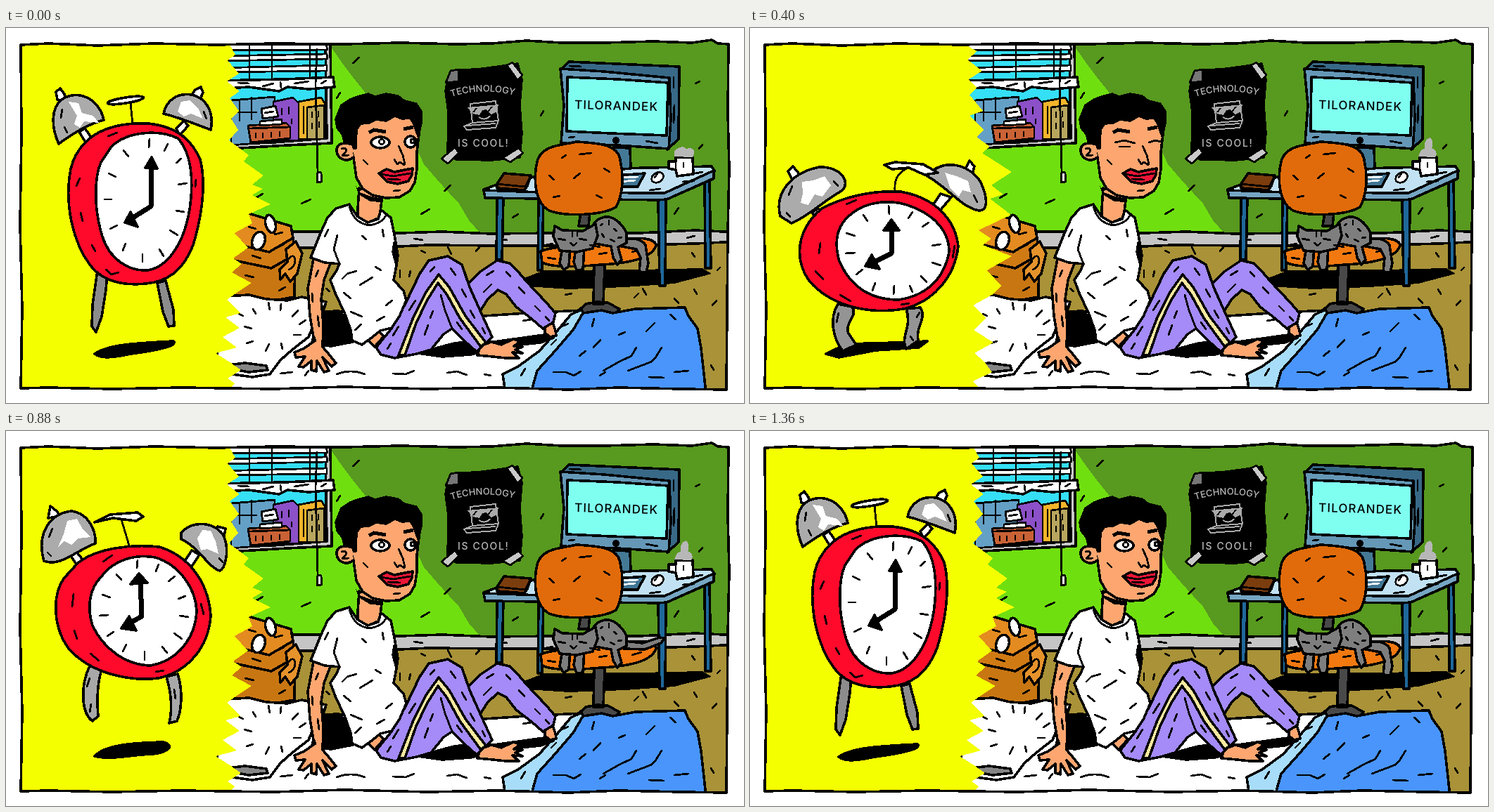
These frames come from a looping animation (1049x534 px, 1440 ms). An HTML page:

```html
<!DOCTYPE html>
<html lang="en">
<head>
<meta charset="utf-8">
<title>Good morning</title>
<style>
html,body{margin:0;width:100%;height:100%;overflow:hidden;background:#fff}
svg{display:block;width:100%;height:100%}
.o,.l{stroke:#000;stroke-width:3.6;stroke-linejoin:round;stroke-linecap:round}
.l{stroke-width:2.8}
.l:not([fill]):not(.w){fill:none}
.hand{stroke-width:7}.key{stroke:#fff}
.w{fill:#fff}.g{fill:#ababab}.red{fill:#ff0a2b}.skin{fill:#fda670}.pur{fill:#a48bf7}.cat{fill:#7e7e7e}.leg{fill:#1f689b}
text{font-family:Inter,"Open Sans",sans-serif;font-weight:500}
/* drawings are held and swapped in ninths of the loop */
.s{animation:1440ms step-end infinite}
.hi{animation-name:hi}.mid{animation-name:mid}.low{animation-name:low}
.e1{animation-name:e1}.e2{animation-name:e2}
.open{animation-name:open}.shut{animation-name:shut}
.glow{animation-name:glow}
.st1{animation-name:st1}.st2{animation-name:st2}.st3{animation-name:st3}
.nap{animation-name:nap}.up{animation-name:up}
.t1{animation-name:t1}.t2{animation-name:t2}.t3{animation-name:t3}
@keyframes hi{0%,44.4%,66.6%,88.8%{visibility:visible}11.1%,55.5%,77.7%,to{visibility:hidden}}
@keyframes mid{0%,22.2%,44.4%,66.6%,88.8%,to{visibility:hidden}11.1%,33.3%,55.5%,77.7%{visibility:visible}}
@keyframes low{0%,33.3%,to{visibility:hidden}22.2%{visibility:visible}}
@keyframes e1{0%,33.3%,77.7%,to{visibility:visible}11.1%,66.6%{visibility:hidden}}
@keyframes e2{0%,33.3%,77.7%,to{visibility:hidden}11.1%,66.6%{visibility:visible}}
@keyframes open{0%,55.5%,to{visibility:visible}22.2%{visibility:hidden}}
@keyframes shut{0%,55.5%,to{visibility:hidden}22.2%{visibility:visible}}
@keyframes glow{0%,22.2%,to{fill:#7ffff0}11.1%{fill:#d2fff8}}
@keyframes st1{0%,44.4%,77.7%{visibility:visible}22.2%,55.5%,88.8%,to{visibility:hidden}}
@keyframes st2{0%,33.3%,66.6%{visibility:hidden}22.2%,55.5%,88.8%,to{visibility:visible}}
@keyframes st3{0%,44.4%,77.7%,to{visibility:hidden}33.3%,66.6%{visibility:visible}}
@keyframes nap{0%,77.7%,to{visibility:visible}66.6%{visibility:hidden}}
@keyframes up{0%,77.7%,to{visibility:hidden}66.6%{visibility:visible}}
@keyframes t1{0%,66.6%,to{visibility:visible}44.4%{visibility:hidden}}
@keyframes t2{0%,55.5%,to{visibility:hidden}44.4%{visibility:visible}}
@keyframes t3{0%,66.6%,to{visibility:hidden}55.5%{visibility:visible}}
</style>
</head>
<body>
<svg viewBox="0 0 1049 534" preserveAspectRatio="none" shape-rendering="crispEdges">
<defs>
<path id="panel" d="M21 24 60 22 130 25 210 22 300 24 380 22 480 23 560 21 640 23 690 22 740 18 790 21 850 21 920 19 975 21 1003 17 1012 22 1027 23 1026 120 1028 200 1026 290 1025 400 1024 515 960 514 870 512 800 515 700 512 600 514 480 511 380 514 250 512 150 514 60 512 21 513 23 400 20 280 22 150Z"/>
<clipPath id="cut"><use href="#panel"/></clipPath>
<path id="arc" d="M633 98Q680 83 730 98"/>
</defs>
<g clip-path="url(#cut)">

<g id="room">
<path fill="#70df10" d="M300 15H700V310H300Z"/>
<path fill="#58991f" d="M458 15 464 30 478 50 493 70 513 95 540 122 568 150 584 172 594 194 612 215 630 235 644 250 658 274 674 292H1040V15Z"/>
<path fill="#a99238" d="M300 305H1040V525H300Z"/>
<path class="o" fill="#c5c5c5" d="M300 291 440 290 560 292 620 290 690 293 780 292 900 292 980 288 1040 291V304L980 307 870 310 700 310 600 309 540 312 430 313 300 312Z"/>
<path class="l" d="M493 50 502 42M980 79 986 76M760 125 764 118M590 265 602 258M623 232 632 224M355 242 365 236M420 250 433 244M950 265 956 256M985 172 990 166M720 270 728 265M470 100 475 92M580 300 592 302M700 300 712 302M968 299 979 296M590 317 596 320M628 312 633 322M668 318 673 312M975 320 979 326M950 385 956 392M978 372 982 379M1004 395 1010 388M1002 480 1006 487M893 384 899 378M560 345 560 355M575 346 573 354M455 371 460 375M795 380 804 378M905 371 910 380M1011 345 1015 341"/>
</g>

<g id="window">
<path class="o" fill="#c9c9c9" d="M300 20 461 20 463 164 400 167 300 173Z"/>
<path class="o" fill="#35dff5" d="M300 20H454L456 157 380 163 300 166Z"/>
<path class="l" fill="#64a0c6" d="M320 103 382 98V162L320 167Z"/>
<path class="l" fill="#8c50c8" d="M380 105 408 99 416 107V160H380Z"/>
<path class="l" fill="#f4b52b" d="M416 105 448 99 453 107V158H416Z"/>
<path class="l" fill="#b8a65e" d="M428 113 452 110V158H428Z"/>
<path class="l" d="M332 104V132M349 99V130M320 120H356M392 115V123M402 113V122M406 130V136M435 120V127M444 119V126M435 136V143M445 134V141M423 112V150"/>
<path class="l" fill="#c96235" d="M344 139 398 135 404 141V157L348 163Z"/>
<path class="l" d="M347 143 403 141M355 150V156M365 150V156M377 149V155M389 148V154"/>
<path class="l w" d="M363 115 383 111 387 126 365 129ZM361 133 392 130V137L361 139ZM368 121 380 119"/>
<path class="l w" d="M300 24 455 24 457 31 300 32ZM300 40 456 37 457 44 300 47ZM300 57 456 53V61L300 63Z"/>
<path class="o w" d="M300 75 395 73 465 70 467 84 430 87 400 84 388 90 345 84 300 87Z"/>
<path class="l" d="M346 24V72M378 24V72M432 24V72M442 30 440 80 443 203M330 78 345 79M365 83 380 79M390 77 391 85M410 79 430 76M448 79 455 75"/>
<path class="l w" d="M443 205 448 206 449 219 442 220Z"/>
</g>

<g id="poster">
<path class="o" d="M628 72 640 60 670 59 700 55 727 51 733 73 730 110 733 150 730 184 690 188 640 187 628 182 629 120 625 90Z"/>
<path class="l" fill="#777" d="M625 78 632 61 643 59 644 76Z"/>
<path class="l" fill="#c9c9c9" d="M712 53 720 49 734 67 727 74ZM619 186 638 170 644 178 628 193ZM706 185 728 171 735 178 717 191Z"/>
<g fill="#b9b9b9"><text font-size="13"><textPath href="#arc">TECHNOLOGY</textPath></text>
<text x="642" y="169" font-size="14" letter-spacing="1.6">IS COOL!</text></g>
<path fill="none" stroke="#aaa" stroke-width="2" d="M660 108 696 104 700 132 663 135ZM663 135 651 140 655 145 696 142 700 132M655 139 696 136M672 127Q681 133 688 125"/>
<path fill="#aaa" d="M656 113 700 109 698 119 690 123 682 116 677 117 673 124 663 122Z"/>
<path stroke="#000" stroke-width="2" d="M664 120 669 114M685 119 691 112"/>
</g>

<g id="desk">
<path d="M734 357 765 345 900 344 990 342 1003 350 950 364 880 369 800 372 740 368Z"/>
<path class="o leg" d="M698 242H707L705 330 697 330ZM757 240H764L762 345H756ZM993 215H1000L1002 342H994Z"/>
<path class="o" fill="#c2e2f4" d="M679 230 700 222 756 211 870 200 1003 197 1007 203 1005 215 937 245 800 243 681 242Z"/>
<path class="o" fill="#76a6c3" d="M679 231 760 234 936 235 1006 203 1006 214 937 245 760 243 681 242Z"/>
<path class="o leg" d="M927 245 938 244 937 367H929Z"/>
<path class="o" fill="#447996" d="M864 170 887 171 888 200 866 202Z"/>
<path class="o" fill="#386987" d="M789 59 800 48 957 55 956 158 940 173Z"/>
<path class="o" fill="#6598b7" d="M788 58 850 62 943 71 945 130 942 172 870 167 789 164 793 110Z"/>
<path class="o s glow" fill="#7ffff0" d="M798 70 870 73 941 78 939 153 860 150 797 147Z"/>
<path class="l" d="M949 70V85M950 110 949 135M801 54 817 55M910 161 926 164M800 156 808 155"/>
<circle cx="867" cy="160" r="5"/>
<text transform="translate(808 115) rotate(1.5)" font-size="17" letter-spacing="1.1">TILORANDEK</text>
<path class="o" fill="#7b3d0e" d="M698 222 708 207 746 210 741 225 737 231 698 228Z"/>
<path class="l" d="M698 222 738 226 746 210M915 231 930 229M962 219 978 218M980 207 990 205"/>
<path class="o" fill="#407695" d="M868 210 908 207 898 226 865 226Z"/>
<path class="l key" d="M876 213 898 212M873 219 894 217"/>
<path class="l w" d="M918 218C916 207 929 202 934 208 937 216 926 224 918 218ZM926 207 922 213"/>
<path class="o w" d="M952 184 976 184 977 208 954 211 952 202 942 200 942 190 952 190Z"/>
<path class="l" d="M952 190V202M963 192V198"/>
<g fill="#b7b7b7">
<path class="s st1" d="M950 183Q948 174 956 171 963 167 967 172 978 169 978 177 977 183 976 184Z"/>
<path class="s st2" d="M950 183Q953 172 959 172 957 159 967 156 973 163 969 171 979 176 974 184Z"/>
<path class="s st3" d="M950 183Q949 172 961 173 964 164 971 169 967 177 974 178V184ZM964 153H970V160H964Z"/>
</g>
</g>

<g id="chair">
<path class="o" fill="#494949" d="M817 262H830L828 282H814ZM836 337 851 337 849 393H835ZM812 404 824 393 840 390 855 391 872 400 864 410H820Z"/>
<path class="o" fill="#e16b0a" d="M755 190C762 166 790 167 811 162 844 164 870 166 873 188 880 218 874 243 867 255 847 267 795 269 772 260 750 248 750 211 755 190Z"/>
<path class="l" d="M772 210 779 216M807 214 816 207M815 180 832 178M839 238 847 242M778 241 787 239M850 200 858 205M790 185 796 181"/>
<path class="o" fill="#f27910" d="M760 318C780 309 830 311 878 302 903 296 924 301 924 310 918 327 888 335 846 337 815 340 779 342 762 334Z"/>
<path class="l" d="M770 327 781 329M843 322 854 320M890 319 903 315"/>
<g class="o cat">
<path class="s t1" d="M878 301C892 298 904 301 909 309L913 335 910 348 900 347 902 327 896 315 875 311Z"/>
<path class="s t2" d="M879 303 900 303 914 319 928 337 921 343 909 331 897 314 877 312Z"/>
<path class="s t3" d="M879 299 905 302 929 294 936 295 931 302 908 311 878 310Z"/>
<path d="M837 307C827 292 833 276 845 271 859 264 875 276 882 292V306L870 312 875 330 869 337 863 327 860 311Z"/>
<g class="s nap">
<path d="M810 314 822 312 820 344 811 345 807 333ZM791 312 802 311 800 339 793 345 787 335Z"/>
<path d="M778 297 780 282 791 288 820 289 838 279 841 296 834 314 811 319 787 317Z"/>
<path class="l" d="M785 300 795 302M815 300 825 302M802 306 807 310 811 306M805 291V297M812 290V296M777 307 768 309M830 309 844 312"/>
</g>
<g class="s up">
<path d="M817 305 826 304 823 340 816 348 812 332ZM788 309 799 310 798 340 791 347 784 337Z"/>
<path d="M781 295 780 278 791 283 822 283 837 274 840 297 829 312 809 317 790 313Z"/>
<path class="l" d="M789 295 797 295M813 294 822 294M801 303 806 309 810 303M805 285V291M813 284V290M784 306 775 309M829 303 844 305"/>
</g>
<path class="l" d="M845 281 848 279M857 274V280M864 286 868 289M847 293 850 298M870 299 875 298M859 301 865 304"/>
</g>
</g>

<g id="bed">
<path class="o" fill="#c87612" d="M320 322 377 341 411 322 410 383 370 390 320 380Z"/>
<path class="o" fill="#e38b20" d="M320 265 345 264 405 282 408 299 374 319 320 306Z"/>
<path class="o" fill="#d07a14" d="M320 306 374 319 408 299 412 322 377 342 320 330Z"/>
<path class="o" fill="#e6932c" d="M398 315 412 304 421 321 414 350 404 361 397 350 390 358 389 344 400 333Z"/>
<path class="l" d="M402 329Q409 320 411 330 411 341 402 344M345 283 355 286M382 294 393 291M350 324 362 328M340 352 352 355M388 374 397 369M386 312 395 308"/>
<ellipse class="o w" cx="359" cy="303" rx="9" ry="13" transform="rotate(18 359 303)"/>
<ellipse class="o w" cx="376" cy="279" rx="7" ry="13" transform="rotate(-15 376 279)"/>
<path class="o w" d="M320 412 410 407 470 403 550 409 665 411 740 406 818 402 790 450 730 525H300V490Z"/>
<path class="l" d="M425 495 430 488M390 492 407 490M470 493Q490 485 510 493M550 492 568 493 580 488M627 491 641 489 655 494M680 493 689 495M735 417 752 414M674 425 684 427"/>
<path class="o" fill="#a8ddfa" d="M818 401 803 408 782 433 758 460 728 482 706 493 710 520H748L765 480 804 437 822 410Z"/>
<path class="o" fill="#4995fc" d="M820 406 847 402 862 406 895 400 965 398 970 410 983 428 988 456 995 520H746L755 488 782 458 806 430Z"/>
<path class="l" d="M836 414 833 425M871 437 880 433M922 420 910 432M944 408 952 415M845 444 835 455M896 455 889 467 872 475 849 488M932 455 924 468 918 475 884 488M778 490 796 490 807 495 817 489M815 467 824 460M844 495 852 490M914 497 935 498M950 490 970 488M790 425 799 421M782 444 775 451M738 485 732 495"/>
<path class="o w" d="M300 383 345 380 370 386 400 388 420 383 455 390 452 400 438 421 430 440 407 458 390 473 375 493 350 497 300 490Z"/>
<path class="o" fill="#858585" d="M300 482 340 477 370 481 372 487 345 490Z"/>
<path class="l" d="M351 400 355 407M373 391 375 401M391 393 390 402M415 402 407 411M426 416 417 422M419 437 409 437M339 425 349 428M342 449 351 446M369 460 374 450M393 457 391 449M331 407 337 410"/>
<path class="o" d="M449 404 476 404 490 429 493 447 462 453 434 450 442 425Z"/>
<path class="o" d="M585 463 637 449 674 445 693 447 765 437 778 441 760 448 720 452 660 465 620 468Z"/>
</g>

<g id="man">
<path class="o skin" d="M766 426 777 419 781 431 782 438 773 440 766 434Z"/>
<path class="o pur" d="M655 366 674 347 698 331 716 335 728 347 739 360 768 391 781 406 778 419 763 428 747 414 725 397 711 379 699 373 684 387 673 405 660 397Z"/>
<path class="l" d="M683 352 693 346M711 347 717 354M729 369 737 378M752 396 759 403M690 365 679 376M767 411 772 417"/>
<path class="o skin" d="M674 453 690 447 704 451 721 443 731 446 722 453 734 454 724 458 734 463 720 462 729 470 711 470 682 467 670 466Z"/>
<path class="o skin" d="M514 444 528 430 537 439 524 454Z"/>
<path class="o pur" d="M526 455 548 428 568 392 588 350 601 331 628 325 648 337 659 369 676 407 691 440 669 461 652 446 634 428 622 436 604 458 584 464 552 470 533 465Z"/>
<path class="o" fill="#fce9a0" d="M558 466 579 412 597 376 615 351 630 369 653 410 682 448 675 454 645 413 627 380 614 363 599 387 583 420 567 466Z"/>
<path class="l" d="M618 380 624 402 634 428M603 347 609 340M632 342 639 352M648 372 654 383M660 402 666 413M677 427 681 435M582 388 573 402M558 425 550 438M547 449 542 457M607 403 603 413M600 423 595 437M641 419 648 429"/>
<path class="o skin" d="M437 329 462 333 452 359 448 386 451 422 450 454 461 467 469 477 463 482 450 469 459 488 452 490 442 474 441 489 434 487 434 474 423 483 416 482 425 468 412 469 410 462 424 456 438 446 432 410 429 371Z"/>
<path class="l" d="M440 354 444 345M435 378 436 390M443 410 445 425M438 440 440 446"/>
<path class="o skin" d="M502 228 500 258 500 271 515 277 531 270 535 237Z"/>
<path class="o w" d="M488 251 469 257 457 270 447 292 433 327 453 334 474 336 469 347 461 359 469 380 481 405 490 430 492 445 506 451 521 440 532 431 548 427 559 411 569 388 565 374 551 359 555 338 557 324 552 294 547 270 533 259 529 272 514 277 499 268Z"/>
<path class="o" d="M552 306 557 324 555 337 550 319Z"/>
<path class="l" d="M488 253Q493 277 516 281 537 278 541 264M471 295 466 315 474 336M458 287 453 297M506 296 512 301M535 287 537 297M478 357 485 350 498 346M480 377 490 385M503 366 521 355M490 404 506 411M540 395 549 388M527 417 538 411M525 340 533 345M496 430 505 422"/>
<path d="M497 224 503 234 516 239 535 243 533 248 518 247 501 237Z"/>
<path class="o skin" d="M497 137 521 126 554 120 582 126 587 151 584 177 584 201 581 220 574 232 559 241 540 242 521 238 507 229 498 213 494 185 489 168Z"/>
<path class="o" d="M484 170 478 151 471 142 469 130 477 110 489 102 503 97 515 94 524 98 540 94 557 97 566 104 583 108 590 119 590 135 586 154 580 137 575 128 563 129 553 125 540 132 526 130 516 135 504 136 498 145 497 171Z"/>
<path class="o skin" d="M492 166C478 161 469 166 470 176 472 187 484 192 494 184"/>
<path class="l" d="M477 172Q485 169 483 176L478 182 487 181M508 188 514 194M551 232 560 231"/>
<path class="l" d="M558 168 564 181 567 194M552 187 556 194 560 191 566 195"/>
<path fill="none" stroke="#000" stroke-width="5" d="M516 149 523 145 540 148M565 144 579 141"/>
<g class="s open">
<ellipse class="o w" cx="532" cy="163" rx="13" ry="8"/><circle class="l w" cx="534" cy="162" r="3.5"/>
<ellipse class="o w" cx="575" cy="162" rx="8" ry="8"/><circle class="l w" cx="578" cy="161" r="3"/>
</g>
<path class="s shut l" d="M519 163 532 160 547 164M567 163 576 160 584 162M525 169 540 169"/>
<path class="o" fill="#ed1537" d="M530 207 541 201 552 205 562 203 572 201 578 200 577 209 572 218 557 222 542 219Z"/>
<path class="l" d="M532 208 551 211 575 207M543 215 560 216"/>
</g>

<path class="s e1" fill="#f4ff00" d="M0 0H318V24L326 38 315 46 331 65 314 76 332 90 318 100 331 118 320 129 330 145 317 160 345 181 338 190 366 210 350 223 365 229 350 238 376 251 345 265 350 278 325 292 344 313 323 328 335 336 321 348 349 363 325 379 314 387 333 406 312 412 332 427 308 440 328 455 298 463 320 477 334 487 315 499 325 506 308 525H0Z"/>
<path class="s e2" fill="#f4ff00" d="M0 0H306V24L323 33 309 45 330 61 311 73 322 85 312 95 331 118 312 125 333 145 322 155 341 169 330 178 372 205 343 224 360 237 341 243 371 266 325 288 343 300 331 309 372 325 337 345 357 367 344 380 317 395 335 413 318 430 346 448 319 463 333 475 344 490 317 503 337 525H0Z"/>

<g id="clock">
<g class="s hi">
<path class="o" d="M126 464C145 451 180 449 238 446 246 453 209 460 178 464 149 470 135 471 126 464Z"/>
<path class="o" fill="#8c8c8c" d="M130 345 144 350 142 373 136 411 128 433 122 425 123 394ZM215 363 227 360 238 401 239 424 231 425 223 404Z"/>
<path class="o w" d="M104 148 112 143 126 162 117 169ZM242 143 253 132 259 139 247 153Z"/>
<path class="o w" d="M73 102 71 91 77 86 83 94 85 105ZM263 97 269 88 277 84 280 92 276 101Z"/>
<path class="o g" d="M75 165C64 141 64 114 79 102 102 86 133 101 139 131 116 137 95 150 75 165ZM224 122C228 103 243 92 264 95 286 100 296 122 291 145 270 137 248 128 224 122Z"/>
<path class="w" d="M89 105 103 107 108 121 124 125 132 135 111 133 105 142 97 137 101 125ZM249 105 261 103 273 114 280 129 263 122 253 126 244 119Z"/>
<path class="l" d="M80 116 78 128M83 141 87 149M281 119 285 129M177 106 180 138"/>
<ellipse class="o w" cx="170" cy="103" rx="26" ry="4" transform="rotate(-9 170 103)"/>
<path class="o red" d="M105 172C124 145 160 134 202 136 242 140 263 158 276 187 285 222 278 270 266 309 251 347 229 361 199 364 160 368 134 357 119 337 95 304 85 255 90 213 92 194 98 181 105 172Z"/>
<path class="o w" d="M150 169C172 147 217 144 244 157 264 177 267 220 261 258 254 302 233 339 202 345 173 347 147 328 137 297 124 255 126 212 135 191Z"/>
<path class="l" d="M204 158 203 170M230 165 225 175M249 186 242 192M257 221 245 223M253 262 242 260M244 295 233 288M224 325 218 315M194 333 194 322M166 317 170 307M148 286 158 281M140 244 150 244M146 207 156 212M167 174 174 183M105 214 100 225M106 263 109 275M122 309 127 318M145 154 158 149M142 344 150 351 160 348M270 216 269 226"/>
<path class="l hand" d="M206 196V254L174 274"/><path class="o" d="M198 199 207 184 215 200ZM169 277 177 262 187 283Z"/>
</g>

<g class="s mid">
<path class="o" d="M126 463C140 447 181 444 224 443 240 448 232 457 209 460 176 461 149 469 126 463Z"/>
<path class="o" fill="#a8a8a8" d="M120 332 138 334C129 357 129 382 131 406L123 413C109 404 103 367 120 332ZM228 350 244 346C253 374 248 402 243 413L232 416C237 394 234 370 228 350Z"/>
<path class="o w" d="M92 178 101 173 117 193 108 201ZM251 190 264 170 275 176 260 199Z"/>
<path class="o w" d="M60 124 63 107 72 114 77 121ZM297 145 301 136 312 139 310 150Z"/>
<path class="o g" d="M54 185C44 151 58 118 93 114 120 118 128 145 127 160 97 172 76 194 54 185ZM249 145C264 126 300 129 310 151 318 172 311 196 304 199 288 195 274 165 249 154Z"/>
<path class="w" d="M87 128 101 125 109 140 120 151 103 153 93 162 83 157 74 165 82 147ZM279 141 291 142 298 157 302 175 286 168 277 170 272 153Z"/>
<path class="l" d="M66 139 61 151M59 173 64 178M303 181 308 187M164 126 175 163"/>
<path class="o w" d="M126 130 148 119 187 116 195 122 185 128 152 124Z"/>
<path class="o red" d="M102 188C130 166 180 161 218 165 263 179 288 218 291 263 288 307 260 342 217 352 174 357 121 345 90 311 67 281 65 235 82 210Z"/>
<path class="o w" d="M135 208C153 183 184 175 212 180 248 191 270 226 271 257 269 294 245 327 205 334 169 333 138 309 123 277 114 249 120 223 135 208Z"/>
<path class="l" d="M187 184 186 195M217 190 213 200M240 207 231 214M255 235 245 239M259 265 247 263M250 296 239 288M229 316 222 307M197 326 197 314M166 314 171 304M144 292 153 286M133 263 145 262M137 233 148 237M157 204 164 212M96 232 94 250M97 284 101 296M120 317 132 327M138 186 151 177M277 246 281 261M213 343 224 341M119 352 115 364M239 368 241 381M121 389 119 400"/>
<path class="l hand" d="M191 214 193 264 171 276"/><path class="o" d="M177 218 189 203 201 216ZM164 281 175 264 185 284Z"/>
</g>

<g class="s low">
<path class="o" d="M108 464 137 450 207 448 252 446 240 455 179 459 126 469Z"/>
<path class="o" fill="#949494" d="M125 393 145 397C154 411 134 419 140 435L151 451 132 460C118 442 112 414 125 393ZM222 400 242 398C252 413 235 425 239 445L222 457C213 440 231 426 222 400Z"/>
<path class="o w" d="M88 263 97 257 109 269 99 278ZM258 255 271 236 286 241 270 260Z"/>
<path class="o w" d="M60 216 54 204 61 197 71 209ZM305 203 312 189 319 197 316 208Z"/>
<path class="o g" d="M43 268C34 233 61 205 99 198 130 198 144 220 130 232 106 245 82 269 59 278ZM252 211C270 187 307 190 327 218 338 240 339 260 326 260 302 257 280 226 252 211Z"/>
<path class="w" d="M74 219 90 217 106 211 115 224 103 240 92 237 83 252 72 249 75 236ZM277 206 294 211 310 218 314 234 302 231 297 240 285 229Z"/>
<path class="l" d="M60 225 55 238M52 263 57 269M318 238 323 248M119 218 125 225M223 200C209 207 205 216 206 232"/>
<path class="o w" d="M191 195 206 191 246 194 267 206 248 209 226 199 202 201Z"/>
<path class="o red" d="M102 257C134 240 174 231 214 233 262 241 292 272 296 311 291 354 262 389 219 400 165 409 113 394 84 360 63 330 65 288 102 257Z"/>
<path class="o w" d="M145 264C168 246 201 244 226 253 265 267 283 291 283 319 276 356 252 381 211 387 169 387 142 366 127 332 118 301 125 279 145 264Z"/>
<path class="l" d="M197 253 198 265M231 262 225 271M254 277 245 283M271 308 259 310M271 338 259 334M251 362 243 353M231 376 227 367M204 379 205 367M174 374 178 363M151 351 160 344M136 321 149 320M137 292 149 296M161 266 167 275M100 306 98 321M93 346 104 358M128 380 143 389M137 251 151 245M291 310 288 327M215 394 226 392M126 406 123 419M241 405 237 412M228 439 232 445"/>
<path class="l hand" d="M201 285V321L175 334"/><path class="o" d="M190 288 201 273 212 288ZM164 339 173 323 184 343Z"/>
</g>
</g>
</g>
<use href="#panel" fill="none" class="o"/>
</svg>
</body>
</html>
```
